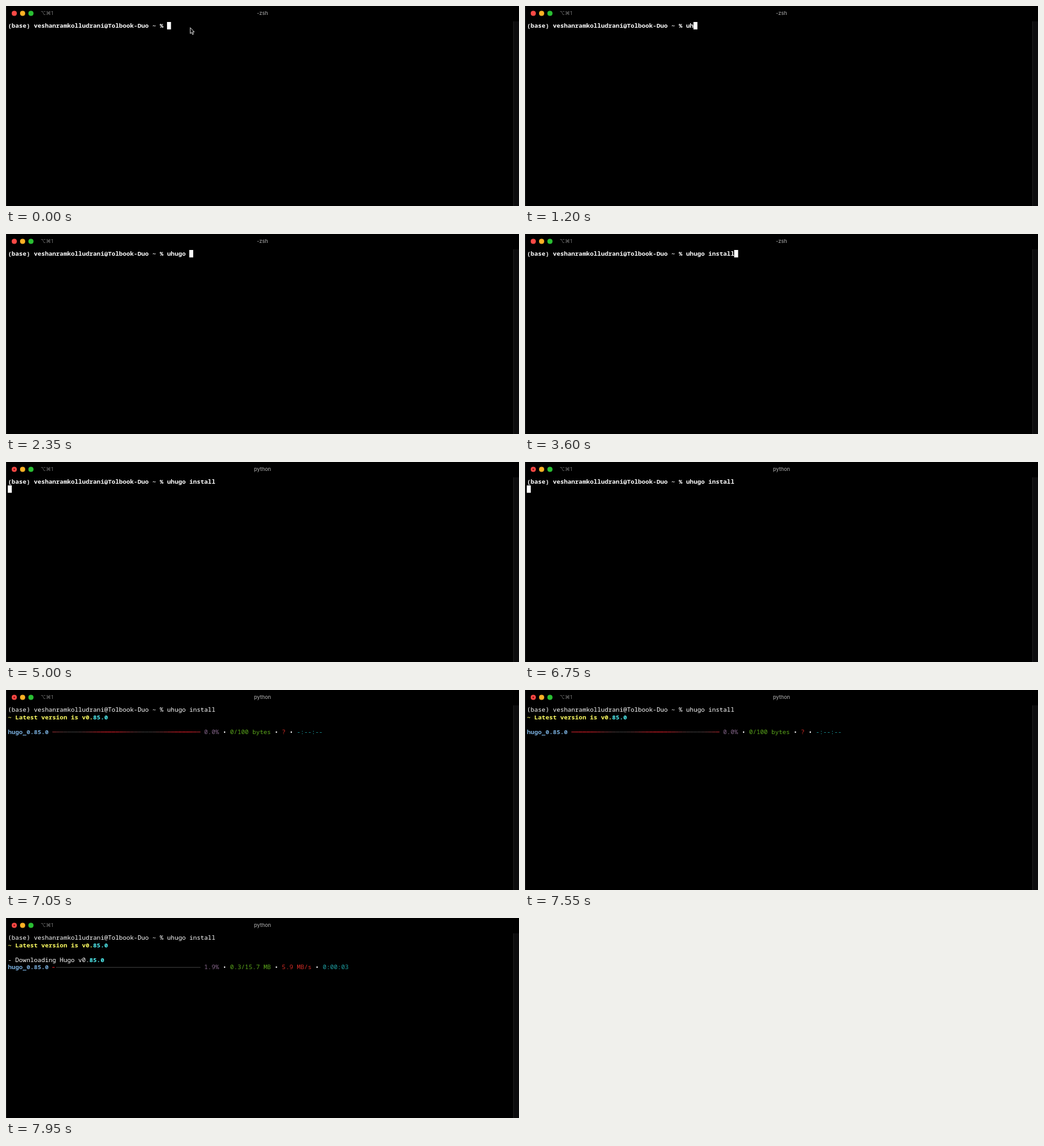
Write an HTML page with a canvas that moves like this. It is 800 px wide and 313 px high and loops after 8 s.

```html
<!DOCTYPE html>
<html lang="en">
<head>
<meta charset="utf-8">
<title>Terminal</title>
<style>
  html, body { margin: 0; height: 100%; overflow: hidden; background: #000; }
  canvas { display: block; width: 800px; height: 313px; }
</style>
</head>
<body>
<canvas id="stage"></canvas>
<script>
const LOOP = 8000;
const CELL = 5.775, ROW = 11.6, LEFT = 3, TOP = 25;
const MONO = '"Noto Sans Mono", "DejaVu Sans Mono", monospace';
const PROMPT = '(base) veshanramkolludrani@Tolbook-Duo ~ % ';
const COMMAND = 'uhugo install';
const KEY_TIMES = [950, 1200, 1450, 1950, 2100, 2350, 2600, 2700, 2850, 3050, 3300, 3450, 3600];
const ENTER = 4350, PYTHON = 4750, FETCH = 5850, FETCHED = 6750, WAIT = 6800,
      DOWNLOAD = 7600, START = 7850, PROGRESS = 7950;
const SPINNER = '⠋⠙⠹⠸⠼⠴⠦⠧⠇⠏';
const BAR_COL = 12, BAR_CELLS = 40, PULSE = 20;
const WHITE = '#fff', YELLOW = '#ffff62', AQUA = '#52f6f8', BLUE = '#78addb',
      PURPLE = '#85668a', GREEN = '#5ca81c', RED = '#d42c26', TEAL = '#1fa3a6';
const BAR_RED = [205, 27, 37], BAR_GREY = [52, 52, 52];

const canvas = document.getElementById('stage');
const ctx = canvas.getContext('2d');
const ratio = window.devicePixelRatio || 1;
canvas.width = 800 * ratio;
canvas.height = 313 * ratio;

const colX = col => LEFT + col * CELL;
const rowY = row => TOP + row * ROW;

function rect(x, y, w, h, color) {
  ctx.fillStyle = color;
  ctx.fillRect(x, y, w, h);
}

function dot(x, y, r, color) {
  ctx.fillStyle = color;
  ctx.beginPath();
  ctx.arc(x, y, r, 0, 2 * Math.PI);
  ctx.fill();
}

// Writes text on the character grid and returns the next free column.
function write(row, col, text, color = WHITE, weight = 500) {
  ctx.font = `${weight} 9.62px ${MONO}`;
  ctx.textAlign = 'left';
  ctx.fillStyle = color;
  for (const char of text) ctx.fillText(char, colX(col++), rowY(row) + 9);
  return col;
}

function writeParts(row, col, parts) {
  for (const part of parts) col = write(row, col, ...part);
}

function block(row, col) {
  rect(colX(col) - 0.2, rowY(row), CELL + 0.4, ROW, WHITE);
}

function drawWindow(t) {
  rect(0, 0, 800, 313, '#000');
  rect(0, 0, 1, 313, '#1b1b1b');
  rect(791, 24, 9, 289, '#0c0c0d');
  rect(791, 24, 1, 289, '#1c1c1d');
  ['#fc4a46', '#fdb125', '#2ac033'].forEach((color, i) => dot(12.9 + 13 * i, 11.6, 4, color));
  if (t >= PYTHON) dot(12.9, 11.6, 1.3, '#8c1010');
  ctx.font = '8px Inter, "DejaVu Sans", sans-serif';
  ctx.textAlign = 'left';
  ctx.fillStyle = '#747474';
  ctx.fillText('⌥⌘1', 54, 14.3);
  ctx.font = '500 8px Inter, sans-serif';
  ctx.textAlign = 'center';
  ctx.fillStyle = '#9c9c9c';
  ctx.fillText(t < PYTHON ? '-zsh' : 'python', 400, 14.2);
}

function drawPointer() {
  const arrow = new Path2D('M287.3 33.8V43.2L289.3 41.3L290.9 44.7L292.4 44L290.9 40.7H293.7Z');
  ctx.fillStyle = '#000';
  ctx.fill(arrow);
  ctx.strokeStyle = '#e8e8e8';
  ctx.lineWidth = 0.9;
  ctx.stroke(arrow);
}

function barPiece(row, cell, cells, [r, g, b]) {
  rect(colX(BAR_COL + cell), rowY(row) + 5.3, cells * CELL, 1.2, `rgb(${r},${g},${b})`);
}

function drawPulse(row, t) {
  const offset = 7 - Math.floor((t - 7550) * 0.015);
  for (let i = 0; i < BAR_CELLS; i++) {
    const fade = 0.5 + Math.cos((i + offset) / PULSE * 2 * Math.PI) / 2;
    barPiece(row, i, 1, BAR_RED.map((c, k) => Math.round(c + (BAR_GREY[k] - c) * fade)));
  }
}

function drawDownload(row, t) {
  write(row, 0, 'hugo_0.85.0', BLUE, 700);
  if (t < START) {
    drawPulse(row, t);
  } else {
    const done = t < PROGRESS ? 0 : 1;
    barPiece(row, 0, done * 0.6, BAR_RED);
    barPiece(row, done, BAR_CELLS - done, BAR_GREY);
  }
  const running = t >= PROGRESS;
  const size = running ? '0.3/15.7 MB' : t < START ? '0/100 bytes' : '0.0/15.7 MB';
  writeParts(row, 53, [
    [running ? '1.9%' : '0.0%', PURPLE], [' • '],
    [size, GREEN], [' • '],
    [running ? '5.9 MB/s' : '?', RED], [' • '],
    [running ? '0:00:03' : '-:--:--', TEAL]
  ]);
}

function drawOutput(t) {
  if (t < FETCH || (t >= FETCHED && t < WAIT)) {
    block(1, 0);
  } else if (t < FETCHED) {
    write(1, 0, SPINNER[Math.floor((t - FETCH) / 80) % SPINNER.length], GREEN);
    write(1, 2, 'Fetching latest version');
  } else {
    writeParts(1, 0, [['~ Latest version is v0.', YELLOW, 700], ['85.0', AQUA, 700]]);
    const downloading = t >= DOWNLOAD;
    if (downloading) writeParts(3, 0, [['- Downloading Hugo v0.'], ['85.0', AQUA, 700]]);
    drawDownload(downloading ? 4 : 3, t);
  }
}

function draw(t) {
  ctx.setTransform(ratio, 0, 0, ratio, 0, 0);
  drawWindow(t);
  const typed = KEY_TIMES.filter(time => time <= t).length;
  const promptWeight = t < WAIT ? 600 : 500;
  const end = write(0, 0, PROMPT + COMMAND.slice(0, typed), WHITE, promptWeight);
  if (t < KEY_TIMES[0]) drawPointer();
  if (t < ENTER) block(0, end);
  else drawOutput(t);
}

const begin = performance.now();
function tick() {
  draw((performance.now() - begin) % LOOP);
  requestAnimationFrame(tick);
}
tick();
</script>
</body>
</html>
```
